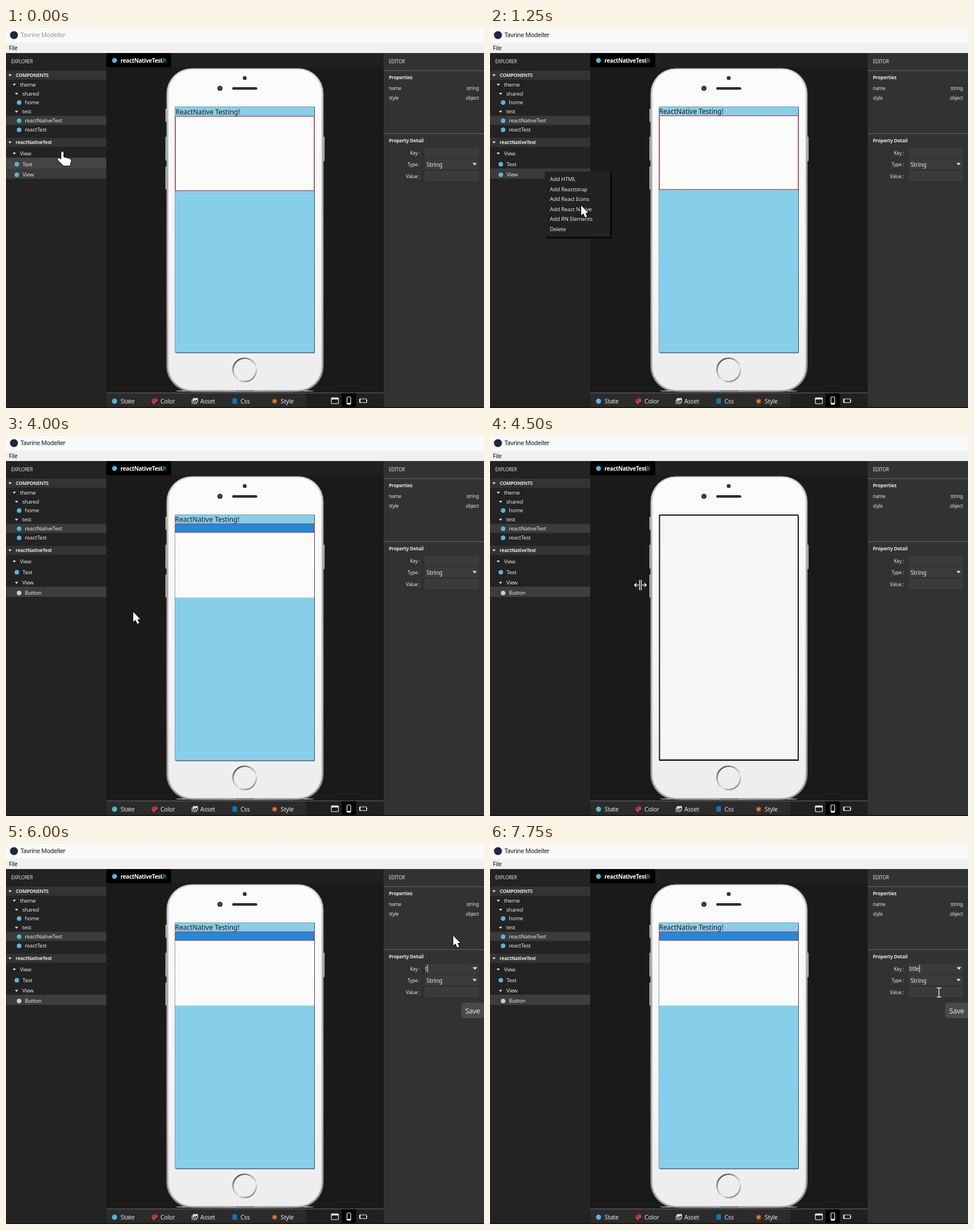
Animation of 839 by 668 pixels, one loop 8000 ms. Source, as an HTML page with a canvas:

```html
<!DOCTYPE html>
<html lang="en">
<head>
<meta charset="utf-8">
<title>Component editor</title>
<style>
  html, body { margin: 0; width: 100%; height: 100%; overflow: hidden; background: #1a1a1a; }
  canvas { display: block; }
</style>
</head>
<body>
<canvas id="stage" width="839" height="668"></canvas>
<script>
const ctx = document.getElementById('stage').getContext('2d');
const LOOP = 8000, STEP = 250;
const LIGHT = '#e2e2e2', REACT = '#55b9d6';

function rect(x, y, w, h, fill) {
  ctx.fillStyle = fill;
  ctx.fillRect(x, y, w, h);
}

function round(x, y, w, h, r, fill, stroke, line = 1) {
  ctx.beginPath();
  ctx.roundRect(x, y, w, h, r);
  if (fill) { ctx.fillStyle = fill; ctx.fill(); }
  if (stroke) { ctx.strokeStyle = stroke; ctx.lineWidth = line; ctx.stroke(); }
}

function dot(x, y, r, fill) {
  ctx.beginPath();
  ctx.arc(x, y, r, 0, Math.PI * 2);
  ctx.fillStyle = fill;
  ctx.fill();
}

// y is the middle of the capital letters
function text(str, x, y, { size = 9.6, color = LIGHT, weight = 400, align = 'left', spacing = -0.03 } = {}) {
  ctx.font = `${weight} ${size}px "Noto Sans", "Open Sans", sans-serif`;
  ctx.letterSpacing = spacing * size + 'px';
  ctx.textAlign = align;
  ctx.fillStyle = color;
  ctx.fillText(str, x, y + size * 0.36);
}

function shape(d, x, y, fill, stroke, line = 1) {
  const path = new Path2D(d);
  ctx.save();
  ctx.translate(x, y);
  ctx.lineJoin = 'round';
  if (stroke) { ctx.strokeStyle = stroke; ctx.lineWidth = line; ctx.stroke(path); }
  if (fill) { ctx.fillStyle = fill; ctx.fill(path); }
  ctx.restore();
}

const triangle = (x, y, s = 1) => shape(`M${-3 * s} ${-1.5 * s}h${6 * s}l${-3 * s} ${3.5 * s}z`, x, y, LIGHT);

function gradient(x0, y0, x1, y1, ...colors) {
  const g = ctx.createLinearGradient(x0, y0, x1, y1);
  colors.forEach((c, i) => g.addColorStop(i / (colors.length - 1), c));
  return g;
}

function branch(label, x, y) {
  triangle(x, y);
  text(label, x + 10, y);
}

function leaf(label, x, y, color = REACT) {
  dot(x, y, 4, color);
  text(label, x + 10, y);
}

function drawWindow(t) {
  rect(0, 0, 839, 26, '#f9f9f9');
  dot(14, 12.5, 7, '#20283a');
  text('Tavrine Modeller', 25.5, 12.5, { size: 10.7, color: t < 250 ? '#999' : '#111' });
  rect(0, 26, 839, 18, '#f0f0f0');
  text('File', 5, 35, { size: 10.3, color: '#111' });
  rect(0, 44, 176, 624, '#232323');
  rect(176, 44, 487, 25, '#202020');
  rect(176, 69, 487, 573, '#1a1a1a');
  rect(663, 44, 176, 624, '#323232');
  rect(176, 44, 114, 25, '#000');
  dot(190.5, 57, 4.3, REACT);
  text('reactNativeTest', 201, 57, { size: 9.9, weight: 600, color: '#fff' });
  dot(277, 57, 4.2, '#1b5e28');
}

function drawTree(t) {
  const added = t >= 1750, named = t >= 2500;
  text('EXPLORER', 9, 59, { size: 8.3 });
  for (const [label, y] of [['COMPONENTS', 83], ['reactNativeTest', 201]]) {
    rect(0, y - 8, 176, 16, '#333');
    triangle(7, y);
    text(label, 17, y, { size: 8.5, weight: 600 });
  }
  rect(0, 154.5, 176, 16, '#3b3b3b');
  branch('theme', 14.5, 99.5);
  branch('shared', 18.5, 115.5);
  leaf('home', 23, 131);
  branch('test', 18.5, 147);
  leaf('reactNativeTest', 23, 163);
  leaf('reactTest', 23, 179);

  if (t < 250) rect(0, 228, 176, 19, '#444');
  if (named) rect(0, 265, 176, 18, '#3d3d3d');
  else rect(0, 247, 176, added ? 35 : 18, '#3b3b3b');
  branch('View', 14.5, 220.5);
  leaf('Text', 19, 239.5);
  if (named) {
    branch('View', 18.5, 258);
    leaf('Button', 23, 276, '#ccc');
  } else {
    leaf('View', 19, 258);
    if (added) dot(28, 275, 4, '#ccc');
  }
}

function drawToolbar() {
  rect(176, 642, 351, 26, '#2b2b2b');
  rect(527, 642, 136, 26, '#202020');
  rect(176, 641, 487, 1, '#696969');
  rect(589, 642, 25, 26, '#000');
  [['State', 201], ['Color', 271], ['Asset', 341], ['Css', 411.5], ['Style', 482]]
    .forEach(([label, x]) => text(label, x, 656, { size: 10.9 }));
  dot(190.5, 656, 4.5, REACT);
  shape('M0 5C-7 4-6-5 1-5C6-5 7 1 3 1C0 1 2 4 0 5z', 260.5, 656, '#d63a3a');
  dot(258.5, 655, .9, '#2b2b2b');
  dot(261, 653.3, .9, '#2b2b2b');
  round(326.5, 653, 8, 7.5, 1, null, '#ddd');
  round(328, 650.5, 9, 8, 1, '#ddd');
  shape('M0 5l2.5-3 1.5 1.5 2-2.5 2 4z', 328.7, 652.3, '#2b2b2b');
  rect(397.5, 651, 8, 9.5, '#0b75b7');
  shape('M0-4.5V4.5M-4-2.3L4 2.3M-4 2.3L4-2.3', 471.5, 656, null, '#f58a1f', 1.8);
  round(571, 650, 12.5, 10.5, 1.5, null, '#eee', 1.2);
  rect(571, 650, 12.5, 3, '#eee');
  round(598.5, 648.5, 6.5, 13, 1.5, null, '#fff', 1.2);
  rect(598.5, 659, 6.5, 2.5, '#fff');
  round(620.5, 652, 12.5, 6.5, 1, null, '#eee', 1.1);
  rect(620, 652, 2.2, 6.5, '#eee');
  rect(632, 654, 2, 2.5, '#eee');
}

function drawPhone() {
  [[142, 23], [191, 42], [243, 41]].forEach(([y, h]) => round(280, y, 4, h, 1, '#d5d5d5', '#777', .6));
  round(555, 191, 4, 43, 1, '#d5d5d5', '#777', .6);
  ctx.beginPath();
  ctx.ellipse(419, 638, 121, 2, 0, 0, Math.PI * 2);
  ctx.fillStyle = '#bbb';
  ctx.fill();
  round(282, 71, 275, 568, 44, gradient(0, 71, 0, 639, '#d8d8d8', '#aaa', '#b8b8b8', '#999'), '#858585');
  round(285, 72.5, 269, 564, 42, gradient(0, 72, 0, 637, '#fbfbfb', '#f7f7f7', '#ededed'), '#d8d8d8');
  rect(404, 637, 31, 2, '#777');
  dot(419, 88, 3.5, '#353535');
  dot(375.5, 106, 4.6, '#2b3444');
  dot(375, 106, 2.4, '#3a4c69');
  round(397, 104, 44, 4.5, 2.2, '#302b2c');
  ctx.beginPath();
  ctx.arc(419, 601, 20.5, 0, Math.PI * 2);
  ctx.strokeStyle = gradient(405, 581, 433, 621, '#444', '#aaa', '#e4e4e4', '#777');
  ctx.lineWidth = 2.6;
  ctx.stroke();
}

function drawScreen(t) {
  const within = (a, b) => t >= a && t < b;
  if (within(500, 1000) || within(4250, 4750) || within(6500, 7000)) {
    round(297.5, 139, 243.5, 431, 1, '#f6f6f6', '#161616', 2);
    rect(297, 568.5, 245, 2.5, '#161616');
    return;
  }
  const shift = t < 500 ? 1 : 0, top = 154 + shift;
  rect(296, 138, 246, 433, '#8d9ba1');
  rect(297, 139, 244, 432, '#87ceeb');
  rect(541, 139, 1, 432, '#444');
  rect(298, 570.5, 243, 1, '#222');
  text('ReactNative Testing!', 296.5 + shift, 147 + shift, { size: 11.9, color: '#1b1b1b', spacing: 0 });
  rect(297, top, 244, 130 + shift, '#fbfbfb');
  const button = t >= 2500;
  if (button) rect(297, 154, 244, 16, '#2089dc');
  ctx.strokeStyle = '#c1383c';
  ctx.lineWidth = 1.2;
  ctx.strokeRect(297.5, top + .3, 243.5, button ? 15 : 129.5 + shift);
}

function drawEditor(t) {
  const small = { size: 8.5 }, bold = { size: 8.5, weight: 600 };
  text('EDITOR', 672, 59, { size: 8.3 });
  rect(663, 74.5, 176, 1, '#6a6a6a');
  rect(663, 185, 176, 1, '#6a6a6a');
  text('Properties', 672, 87, bold);
  text('Property Detail', 672, 197.5, bold);
  [['name', 'string', 106], ['style', 'object', 123]].forEach(([key, type, y]) => {
    text(key, 672, y, small);
    text(type, 830, y, { ...small, align: 'right' });
  });
  [['Key :', 220], ['Type :', 240], ['Value :', 260.5]].forEach(([label, y]) => {
    text(label, 726.5, y, { ...small, align: 'right' });
    rect(735, y - 9.5, 95, 18, '#3b3b3b');
  });
  text('String', 738, 240, { size: 10.6 });
  triangle(822.5, 239, 1.25);

  if (t < 5750) return;
  const typed = t < 6000 ? 0 : t < 6500 ? 1 : Math.min(5, 2 + Math.floor((t - 6500) / STEP));
  const value = 'title'.slice(0, typed);
  text(value, 735.5, 219.5, { size: 10.6 });
  const caret = 736 + ctx.measureText(value).width;
  if (t < 7500 || t >= 7750) rect(caret, 212.5, 1, 13, '#fff');
  triangle(823, 218.5, 1.35);
  if (t < 6000) return;
  round(799, 279, 44, 27, 5, '#4a4a4a');
  text('Save', 806, 293, { size: 12.6 });
}

function drawMenu(t) {
  if (t < 750 || t >= 1750) return;
  rect(98, 254, 116, 116, '#080808');
  rect(96, 252, 115, 115, '#222');
  ['Add HTML', 'Add Reactstrap', 'Add React Icons', 'Add React Native', 'Add RN Elements', 'Delete']
    .forEach((label, i) => text(label, 105, 265.5 + i * 17.6, { size: 9.8 }));
}

const pointers = {
  arrow: (x, y) => shape('M0 0V17.5L4 14L7 21L10.5 19.5L7.5 13H12.5z', x, y, '#fff', '#000', 2),
  hand: (x, y) => shape('M0 2Q2-2 4 2V10L15 13Q18 14 17 18L15 25H4L-6 15Q-7 11-3 12L0 14z', x, y, '#fff', '#000', 1.6),
  beam: (x, y) => {
    const d = 'M-4-8H-1Q0-8 0-7Q0-8 1-8H4M0-7V7M-4 8H-1Q0 8 0 7Q0 8 1 8H4';
    shape(d, x, y, null, '#111', 3);
    shape(d, x, y, null, '#fff', 1.5);
  },
  resize: (x, y) => {
    const d = 'M-1.5-9V9M1.5-9V9M-3 0H-10M-7-3.5L-10.5 0L-7 3.5M3 0H10M7-3.5L10.5 0L7 3.5';
    shape(d, x, y, null, '#000', 3);
    shape(d, x, y, null, '#fff', 1.5);
  }
};

// time, x, y and the pointer kind used from then on
const track = [
  [0, 97, 217, 'hand'], [500, 104, 246, 'hand'], [750, 106, 254, 'arrow'],
  [1250, 160, 312, 'arrow'], [1500, 203, 333, 'arrow'], [3750, 203, 333, 'arrow'],
  [4500, 264, 262, 'resize'], [4750, 470, 180, 'arrow'], [5000, 680, 116, 'arrow'],
  [5250, 712, 149, 'arrow'], [5500, 760, 190, 'arrow'], [5750, 784, 219, 'beam'],
  [6000, 785, 161, 'arrow'], [7250, 785, 161, 'arrow'], [7500, 788, 240, 'arrow'],
  [7750, 788, 261, 'beam'], [8000, 788, 261, 'beam']
];

function drawPointer(t) {
  const i = track.findIndex(p => p[0] > t);
  const [t0, x0, y0, kind] = track[i - 1], [t1, x1, y1] = track[i];
  const k = (t - t0) / (t1 - t0);
  pointers[kind](x0 + (x1 - x0) * k, y0 + (y1 - y0) * k);
}

function frame(now) {
  const t = Math.floor(now % LOOP / STEP) * STEP;
  for (const draw of [drawWindow, drawTree, drawToolbar, drawPhone, drawScreen, drawEditor]) draw(t);
  rect(0, 666, 839, 2, '#181818');
  drawMenu(t);
  drawPointer(t);
  requestAnimationFrame(frame);
}
requestAnimationFrame(frame);
</script>
</body>
</html>
```
